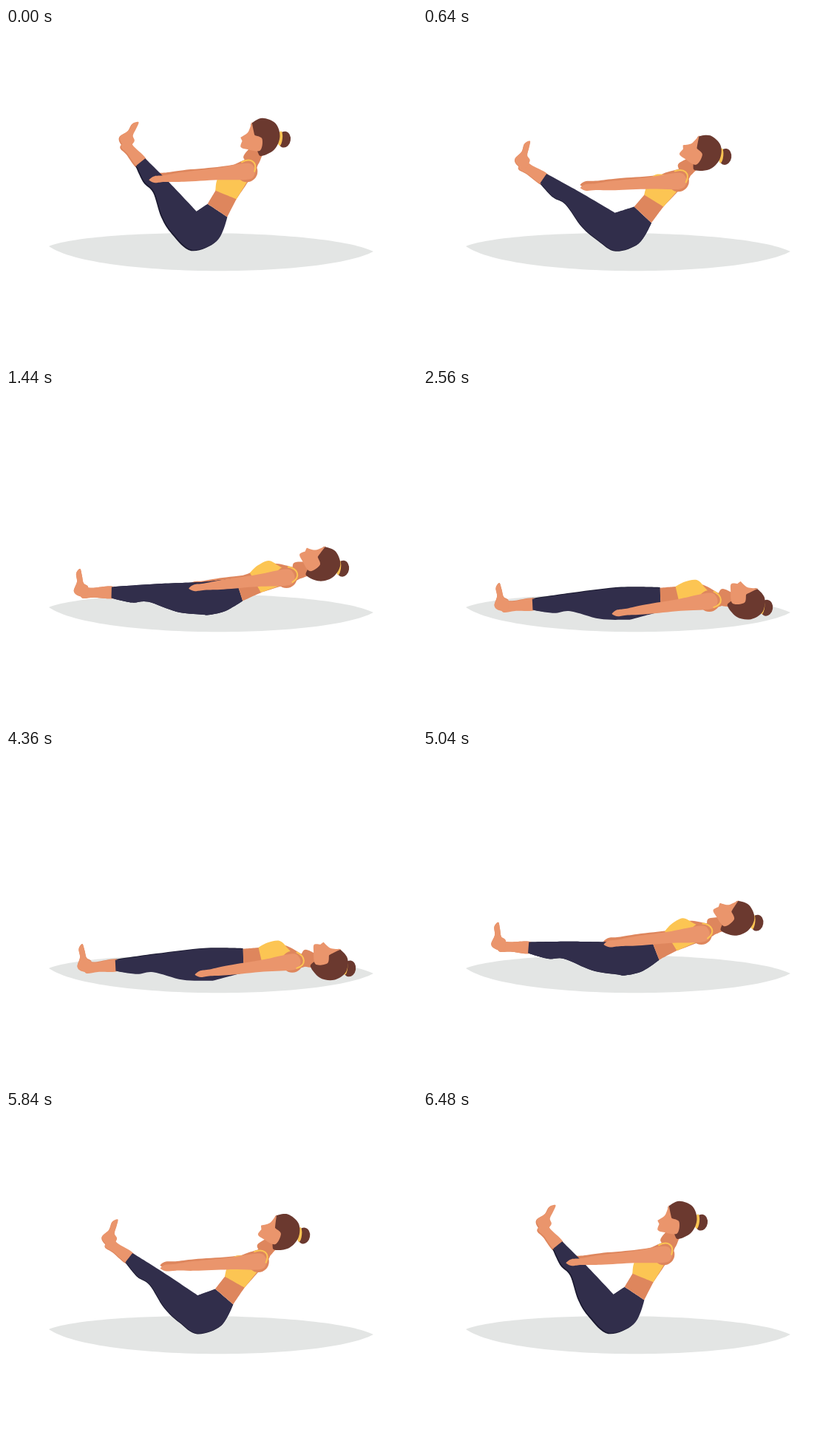
An HTML page with a canvas that plays this animation: 556 by 450 pixels, repeating every 7200 ms.

```html
<!DOCTYPE html>
<html lang="en">
<head>
<meta charset="utf-8">
<title>Boat pose</title>
<style>
html, body { margin: 0; width: 100%; height: 100%; overflow: hidden; background: #fff; }
canvas { display: block; }
</style>
</head>
<body>
<canvas id="stage" width="556" height="450"></canvas>
<script>
const ctx = document.getElementById('stage').getContext('2d');
const LOOP = 7200;
const COLOR = {
  floor: '#e3e5e4', pants: '#312e4b', pantsEdge: '#1a1930', skin: '#ea956c',
  skinShade: '#de865d', top: '#fcc553', hair: '#6b392f'
};

// [time, pose]: 0 boat, 1 leaning back, 2 hollow hold, 3 lying flat
const TIMELINE = [[0, 0], [640, 1], [1440, 2], [2300, 3], [4320, 3],
                  [5040, 1.87], [5840, 0.87], [6480, 0], [LOOP, 0]];

// Hip x and y, then the angles of leg, torso, head and arm in degrees.
const POSES = [
  [257, 273, 231, -56.5, 0, 175],
  [266, 274, 214.5, -47, 22.5, 176],
  [281, 278, 181.3, -18, 48.5, 173.5],
  [288, 284, 177, -2, 76, 172.5]
];

const clamp01 = v => Math.max(0, Math.min(1, v));

function poseAt(time) {
  const i = TIMELINE.findIndex(key => key[0] > time);
  const [t0, p0] = TIMELINE[i - 1], [t1, p1] = TIMELINE[i];
  return p0 + (p1 - p0) * (time - t0) / (t1 - t0);
}

// Cubic blend through the poses, at rest in the first and the last.
function blend(pose) {
  const last = POSES.length - 1;
  const i = Math.min(last - 1, Math.floor(pose)), u = pose - i;
  const slope = (k, n) => k === 0 || k === last ? 0 : (POSES[k + 1][n] - POSES[k - 1][n]) / 2;
  return POSES[i].map((a, n) => {
    const b = POSES[i + 1][n], m0 = slope(i, n), m1 = slope(i + 1, n);
    return a + u * (m0 + u * (3 * (b - a) - 2 * m0 - m1 + u * (2 * (a - b) + m0 + m1)));
  });
}

// Maps a bone's own coordinates (along, across) to the stage.
function bone([x, y], degrees) {
  const c = Math.cos(degrees * Math.PI / 180), s = Math.sin(degrees * Math.PI / 180);
  return (u, v = 0) => [x + u * c - v * s, y + u * s + v * c];
}

// All joints follow from the hip and a few angles.
function skeleton(pose) {
  const [x, y, legAngle, torsoAngle, headAngle, armAngle] = blend(pose);
  const hip = [x, y];
  const leg = bone(hip, legAngle);
  const legLength = 140 - 0.4 * (legAngle - 177);
  const shin = bone(leg(legLength), legAngle - 2);
  const heel = shin(0.35 * legLength);
  const pelvis = bone(hip, 0.8 * torsoAngle + 3);
  const torso = bone(pelvis(33 - 0.11 * torsoAngle), torsoAngle);
  const neck = bone(torso(85), headAngle - 59);
  const shoulder = torso(66, 4);
  return {
    hip, leg, legLength, pelvis, torso, neck, shoulder,
    shin, shinLength: 0.35 * legLength,
    foot: bone(heel, 0.74 * legAngle - 214),
    skull: neck(34), head: bone(neck(34), headAngle),
    arm: bone(shoulder, armAngle), farArm: bone(shoulder, armAngle + 1.8),
    seat: 22 - 0.14 * torsoAngle,
    fold: clamp01(1 + torsoAngle / 40)
  };
}

// Smooth closed outline; roundness maps a point index to 0 (corner) .. 1.
function outline(points, color, roundness = {}) {
  const n = points.length;
  const at = i => points[(i + n) % n];
  const handle = (i, side) => {
    const [x, y] = at(i), [ax, ay] = at(i - 1), [bx, by] = at(i + 1);
    const k = (roundness[(i + n) % n] ?? 1) * side / 6;
    return [x + (bx - ax) * k, y + (by - ay) * k];
  };
  ctx.beginPath();
  ctx.moveTo(...at(0));
  for (let i = 0; i < n; i++) {
    ctx.bezierCurveTo(...handle(i, 1), ...handle(i + 1, -1), ...at(i + 1));
  }
  ctx.fillStyle = color;
  ctx.fill();
}

const shape = (frame, points, color, roundness) =>
  outline(points.map(p => frame(...p)), color, roundness);

// Symmetric limb from [distance, half width] pairs.
function limb(frame, profile, color) {
  const back = profile.slice().reverse().map(([u, w]) => [u, -w]);
  shape(frame, [...profile, ...back], color);
}

function ellipse([x, y], rx, ry, tilt, color) {
  ctx.beginPath();
  ctx.ellipse(x, y, rx, ry, tilt, 0, 2 * Math.PI);
  ctx.fillStyle = color;
  ctx.fill();
}

function drawFloor() {
  ctx.beginPath();
  ctx.moveTo(58, 295);
  ctx.bezierCurveTo(120, 270, 430, 270, 497, 302);
  ctx.bezierCurveTo(430, 338, 120, 338, 58, 295);
  ctx.fillStyle = COLOR.floor;
  ctx.fill();
}

function drawFoot({ shin, shinLength, foot }, color) {
  limb(shin, [[-3, 7.5], [shinLength * 0.5, 6.5], [shinLength - 8, 6.5]], color);
  shape(foot, [[-3, 4], [2, -3], [15, -1], [26, -4], [33, 0], [25, 4], [15, 8], [11, 15], [-2, 15]], color);
}

function drawPants({ hip: [x, y], leg, legLength: len, pelvis, torso, seat, fold }, color) {
  outline([
    leg(len, 7.5), leg(0.6 * len, 12.5), leg(19, 16.5),
    torso(0, -16), torso(0, 16),
    pelvis(12, seat), [x - 5, y + 27],
    leg(16, -27), leg(0.36 * len, -24), leg(0.64 * len, -11.5), leg(0.8 * len, -13), leg(len, -7.5)
  ], color, { 0: 0, 2: fold, 3: 0, 4: 0, 11: 0 });
}

function drawLegs(body, pose) {
  const [x0, y0] = body.leg(0), [x1, y1] = body.leg(0, 0.9 * pose - 1.8);
  ctx.save();
  ctx.translate(x1 - x0, y1 - y0);
  drawFoot(body, COLOR.skinShade);
  drawPants(body, COLOR.pantsEdge);
  ctx.restore();
  drawFoot(body, COLOR.skin);
  drawPants(body, COLOR.pants);
}

function drawTorso({ torso, neck }) {
  limb(neck, [[-6, 10], [10, 10], [22, 10]], COLOR.skinShade);
  shape(torso, [[0, -16], [21, -17], [52, -20], [76, -8], [85, 0], [80, 12], [27, 13], [0, 16]],
    COLOR.skinShade, { 0: 0, 1: 0, 6: 0.4, 7: 0 });
  shape(torso, [[21, -17], [33, -23], [50, -25], [60, -15], [74, 2], [76, 11], [27, 13]],
    COLOR.top, { 0: 0, 3: 0.4, 5: 0.3, 6: 0 });
}

function drawHead({ head, skull: [x, y] }) {
  ellipse([x + 26, y + 4], 8.5, 11, 0.15, COLOR.hair);
  ellipse([x + 20.5, y + 2.5], 3, 10, 0.1, COLOR.top);
  shape(head, [[-19, -17], [-4, -25], [14, -18], [20, 0], [12, 18], [-7, 26], [-15, 3]],
    COLOR.hair, { 0: 0.3, 5: 0.6 });
  shape(head, [[-18, -20], [-23, -6], [-33, 1], [-31, 6], [-33, 14], [-25, 17], [-7, 19], [-4, 3], [-14, -2]],
    COLOR.skin, { 0: 0, 2: 0.3, 3: 0.3, 8: 0.3 });
}

function drawArm(frame, color) {
  limb(frame, [[-10, 5], [0, 11], [40, 8], [86, 6.5], [112, 4.5], [125, 4.5], [132, 1]], color);
}

function drawStrap({ torso }) {
  ctx.beginPath();
  ctx.moveTo(...torso(72, -9));
  ctx.bezierCurveTo(...torso(84, -3), ...torso(86, 9), ...torso(71, 13));
  ctx.strokeStyle = COLOR.top;
  ctx.lineWidth = 2;
  ctx.stroke();
}

function draw(time) {
  const pose = poseAt(time), body = skeleton(pose);
  ctx.fillStyle = '#fff';
  ctx.fillRect(0, 0, 556, 450);
  drawFloor();
  drawArm(body.farArm, COLOR.skinShade);
  drawLegs(body, pose);
  drawTorso(body);
  drawHead(body);
  ellipse(body.shoulder, 14.5, 14.5, 0, COLOR.skinShade);
  drawArm(body.arm, COLOR.skin);
  drawStrap(body);
}

const start = performance.now();
function tick() {
  draw((performance.now() - start) % LOOP);
  requestAnimationFrame(tick);
}
tick();
</script>
</body>
</html>
```
